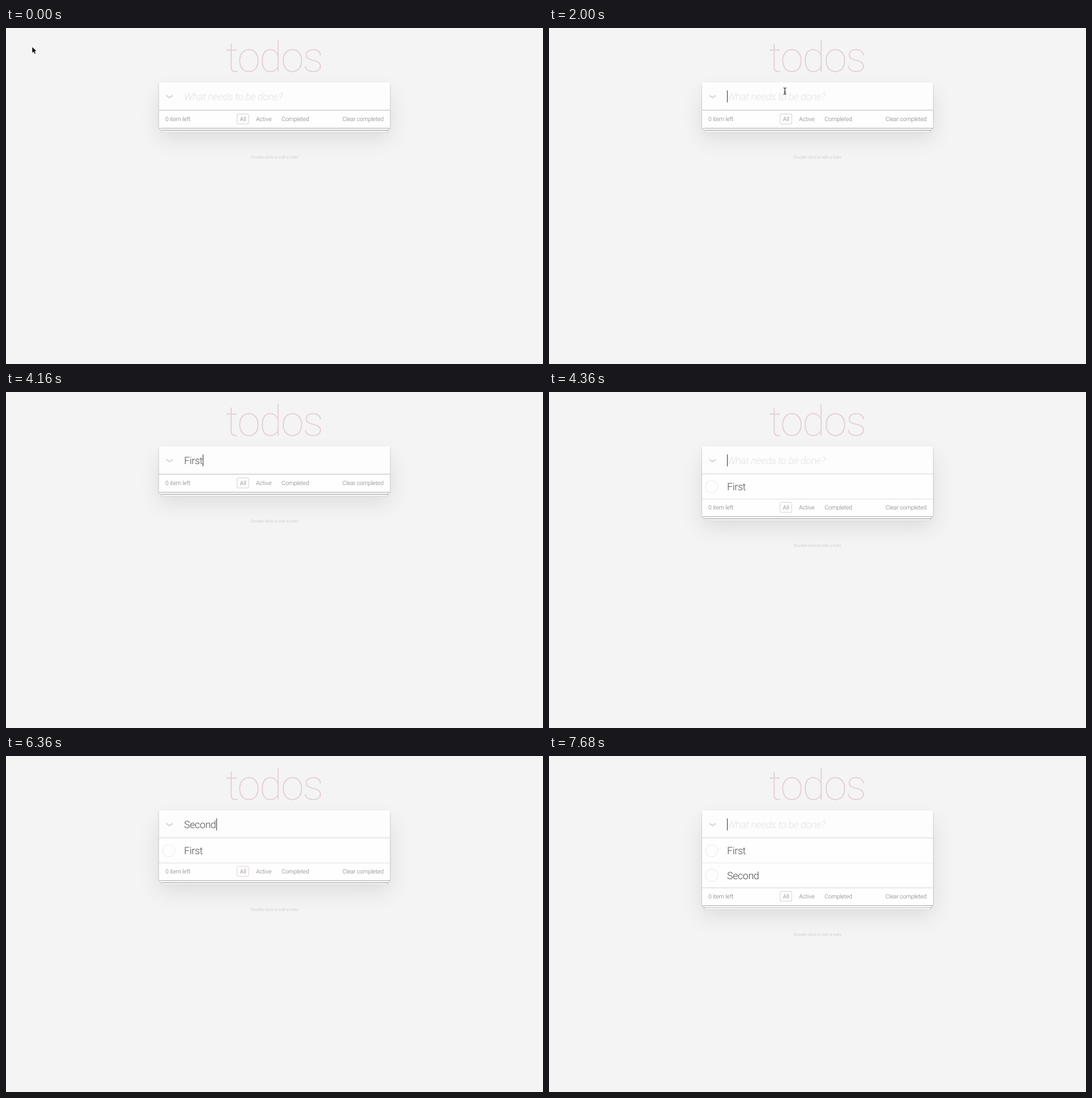
Write an HTML page that moves like this. It is 947x592 px and loops after 8000 ms.

```html
<!DOCTYPE html>
<html lang="en">
<head>
<meta charset="utf-8">
<title>todos</title>
<style>
  html, body { margin: 0; width: 100%; height: 100%; overflow: hidden; background: #f4f4f4; }
  #stage { position: relative; width: 947px; height: 592px; overflow: hidden; }
  #stage > * { position: absolute; }
  #card { left: 270px; top: 96px; width: 407px; background: #fff;
    box-shadow: 0 1.5px 3px rgba(0,0,0,.2), 0 18.5px 37px rgba(0,0,0,.1); }
  #stack { left: 270px; width: 407px; height: 30px;
    box-shadow: 0 .8px .8px rgba(0,0,0,.3), 0 5.9px 0 -2.2px #f8f8f8, 0 6.7px .8px -2.2px rgba(0,0,0,.3),
      0 11.8px 0 -4.4px #f8f8f8, 0 12.6px 1.5px -4.4px rgba(0,0,0,.3); }
  #face { left: 270px; top: 96px; width: 407px; background: #fefefe; }
  #entry { left: 270px; top: 96px; width: 407px; height: 48px; background: #fdfdfd;
    box-shadow: inset 0 -1.5px .8px rgba(0,0,0,.03); }
  svg { left: 0; top: 0; text-rendering: geometricPrecision; font-family: Roboto, "Liberation Sans", sans-serif; }
  .title { font-size: 74px; font-weight: 100; fill: #e6d0d3; letter-spacing: -2.2px; }
  .big { font-size: 17.76px; font-weight: 300; fill: #4d4d4d; letter-spacing: -.35px; }
  .hint { font-style: italic; fill: #e2e2e2; }
  .small { font-size: 10.36px; font-weight: 300; fill: #777; letter-spacing: -.1px; }
  .note { font-size: 7.4px; font-weight: 300; fill: #bfbfbf; }
</style>
</head>
<body>
<div id="stage">
  <div id="card"></div>
  <div id="stack"></div>
  <div id="face"></div>
  <div id="entry"></div>
  <svg width="947" height="592" viewBox="0 0 947 592">
    <text class="title" x="387.5" y="76.5">todos</text>
    <path d="M282.6 118.8 L288.3 122.8 L294 118.8" fill="none" stroke="#d9d9d9" stroke-width="2.4"/>
    <text class="big hint" id="hint" x="314" y="127">What needs to be done?</text>
    <text class="big" id="typed" x="314" y="127"></text>
    <rect x="270" y="144" width="407" height="1" fill="#dcdcdc"/>
    <g id="items"></g>
    <g id="foot">
      <rect x="270" y="145" width="407" height="1" fill="#dedede"/>
      <rect id="pick" x="407.5" y="151.5" width="20.5" height="17.5" rx="2" fill="none"/>
      <g class="small">
        <text x="281" y="164.3">0 item left</text>
        <text x="412.6" y="164.3">All</text>
        <text x="441" y="164.3">Active</text>
        <text x="486" y="164.3">Completed</text>
        <text x="666" y="164.3" text-anchor="end">Clear completed</text>
      </g>
      <text class="note" x="473.5" y="230.3" text-anchor="middle">Double-click to edit a todo</text>
    </g>
    <rect id="caret" y="110" width="1" height="21" fill="#333"/>
    <path id="arrow" d="M0 0 V11.3 L2.6 8.9 L4.4 13 L6.4 12.1 L4.7 8.1 H8.2 Z" fill="#000" stroke="#fff" stroke-width=".7"/>
    <path id="beam" d="M-2.5 -5.5 Q0 -5.5 0 -4 Q0 -5.5 2.5 -5.5 M0 -4.5 V4.5 M-2.5 5.5 Q0 5.5 0 4 Q0 5.5 2.5 5.5 M-1.5 1.8 H1.5" fill="none" stroke="#111" stroke-width="1.1"/>
  </svg>
</div>
<script>
const LOOP = 8000, STEP = 40, ROW = 43.5;
const $ = id => document.getElementById(id);

// Each entry: time, text in the field, finished rows, caret visible
const script = [
  [0, "", 0, 0], [1680, "", 0, 1], [2280, "", 0, 0], [2840, "", 0, 1],
  [3240, "F", 0, 1], [3480, "Fi", 0, 1], [3760, "Fir", 0, 1], [3920, "Firs", 0, 1], [4160, "First", 0, 1],
  [4360, "", 1, 1], [4920, "", 1, 0],
  [5360, "S", 1, 1], [5440, "Se", 1, 1], [5960, "Sec", 1, 1], [6040, "Seco", 1, 1], [6120, "Secon", 1, 1], [6200, "Second", 1, 1],
  [6480, "", 2, 1], [7080, "", 2, 0], [7680, "", 2, 1]
];
// Pointer path: time, x, y
const path = [[960, 46, 33], [1200, 310, 98], [1520, 334, 120], [1840, 334, 120], [2000, 416, 111]];

$("items").innerHTML = ["First", "Second"].map((label, i) => `<g transform="translate(0 ${i * ROW})">
  <rect x="270" y="188" width="407" height="1" fill="#e8e8e8"/>
  <circle cx="287" cy="166.7" r="10.95" fill="none" stroke="#e6e6e6" stroke-width=".9"/>
  <text class="big" x="314" y="173.4">${label}</text></g>`).join("");
const rows = [...$("items").children];

function show(id, on) { $(id).style.display = on ? "" : "none"; }

function pointer(t) {
  const i = path.findIndex(p => p[0] > t);
  if (i === 0) return path[0].slice(1);
  if (i < 0) return path[path.length - 1].slice(1);
  const [a, b] = [path[i - 1], path[i]];
  const u = (t - a[0]) / (b[0] - a[0]);
  const k = i === 1 ? u * u * (1.6 - .6 * u) : u * (2 - u);
  return [1, 2].map(j => a[j] + (b[j] - a[j]) * k);
}

function draw(now) {
  const t = Math.floor((now % LOOP) / STEP) * STEP;
  const [, text, count, blink] = script.filter(s => s[0] <= t).pop();
  const shift = Math.floor(count * ROW);

  rows.forEach((row, i) => row.style.display = i < count ? "" : "none");
  $("foot").setAttribute("transform", `translate(0 ${shift})`);
  $("stack").style.top = 146 + shift + "px";
  $("card").style.height = $("face").style.height = 80 + shift + "px";
  $("pick").setAttribute("stroke", count === 1 ? "#e2cfcf" : "#d0d0d0");

  $("typed").textContent = text;
  show("hint", !text);
  show("caret", blink);
  $("caret").setAttribute("x", 314 + (text ? Math.round($("typed").getComputedTextLength() + .4) : 0));

  const [x, y] = pointer(t), inField = t > 1240;
  show("arrow", !inField);
  show("beam", inField && t < 3240);
  $(inField ? "beam" : "arrow").setAttribute("transform", `translate(${x} ${y})`);
}

const start = performance.now();
function tick() {
  draw(performance.now() - start);
  requestAnimationFrame(tick);
}
draw(0);
tick();
</script>
</body>
</html>
```
